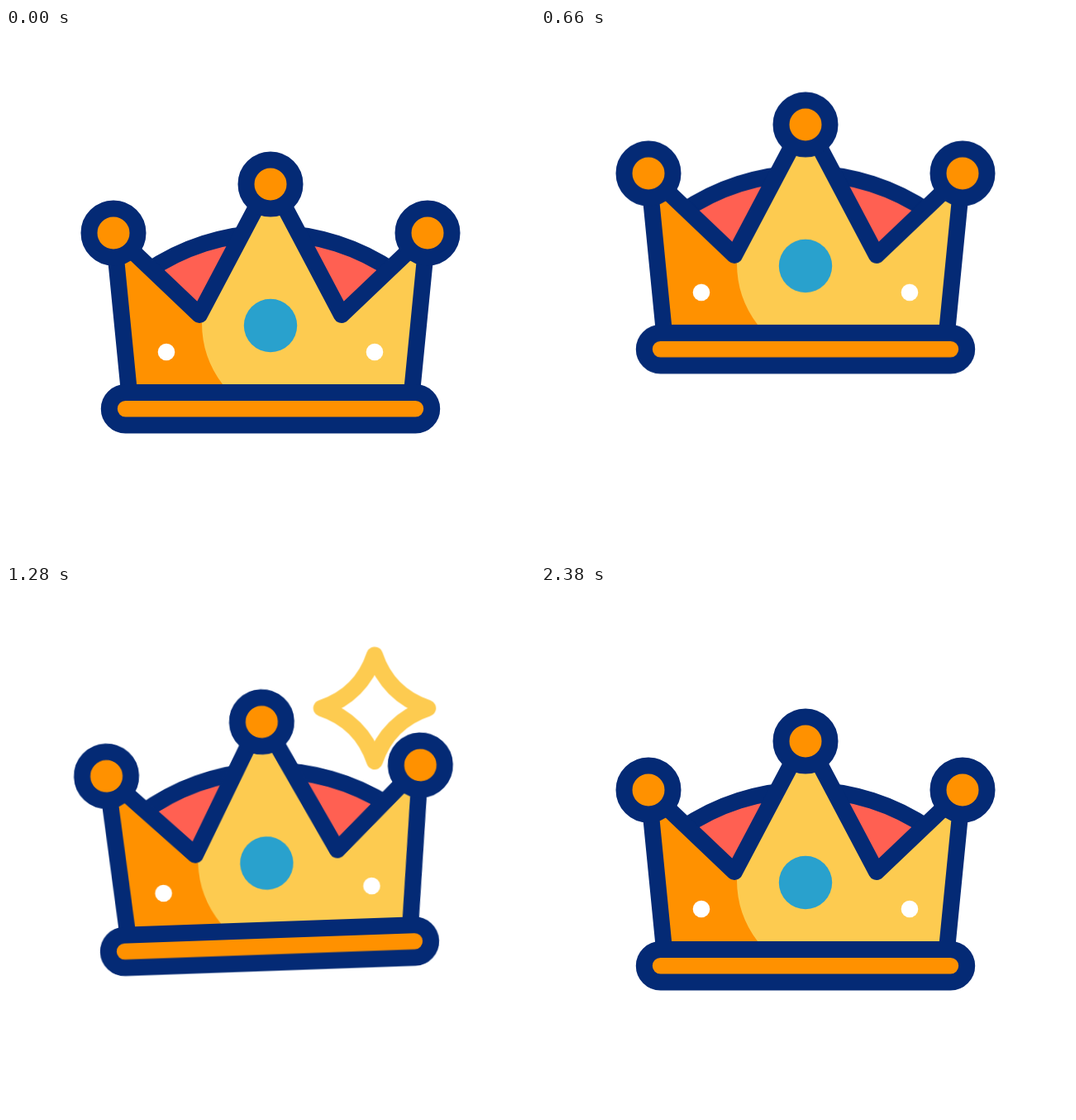
Recreate the animation shown at these times as an HTML page. Size 640 px wide and 640 px high, loop 2.4 s.

```html
<!DOCTYPE html>
<html lang="en">
<head>
<meta charset="utf-8">
<title>Crown</title>
<style>
  html, body { margin: 0; width: 100%; height: 100%; overflow: hidden; background: #fff; }
  svg { display: block; width: 100vw; height: 100vh; }

  .line { stroke: #042a75; stroke-width: 20; stroke-linejoin: round; stroke-linecap: round; }
  .gold { fill: #ff9100; }
  .face { fill: #fdcb50; }

  .hop, .tilt, .shine, .star { animation: 2400ms infinite cubic-bezier(.4, 0, .6, 1); }
  .hop { animation-name: hop; }
  .tilt { animation-name: tilt; transform-origin: 320px 490px; }
  .shine { animation-name: shine; animation-timing-function: linear; fill: #fff; }
  .star {
    animation-name: star;
    fill: none; stroke: #fdcb50; stroke-linejoin: round;
    vector-effect: non-scaling-stroke;
  }

  /* slow lift, fall, then two shrinking bounces */
  @keyframes hop {
    0% { transform: translateY(0); animation-timing-function: cubic-bezier(1, 0, .34, 1); }
    35% { transform: translateY(-76.5px); animation-timing-function: cubic-bezier(.58, 0, .6, 1); }
    47.08% { transform: translateY(-2px); }
    58.33% { transform: translateY(-38px); }
    71.25% { transform: translateY(-1px); }
    76.88% { transform: translateY(-20px); }
    85.83% { transform: translateY(0); }
    90.83% { transform: translateY(-3px); }
    97%, 100% { transform: translateY(0); }
  }
  @keyframes tilt {
    0%, 47.08% { transform: rotate(0deg); }
    59.58% { transform: rotate(-4deg); }
    69.58%, 70.83% { transform: rotate(0deg); }
    76.25% { transform: rotate(-2deg); }
    83.33%, 100% { transform: rotate(0deg); }
  }
  @keyframes shine {
    0%, 26.67% { transform: translateX(250px); }
    42.71%, 100% { transform: translateX(930px); }
  }
  @keyframes star {
    0%, 46.2% { transform: scale(.01); stroke-width: 0; opacity: 0; }
    46.3% { transform: scale(.01); stroke-width: 0; opacity: 1; }
    50% { transform: scale(1); stroke-width: 20; }
    55.83%, 85.83% { transform: scale(.6875); stroke-width: 20; }
    91.67% { transform: scale(1); stroke-width: 20; }
    98.4% { transform: scale(.01); stroke-width: 0; opacity: 1; }
    98.5%, 100% { transform: scale(.01); stroke-width: 0; opacity: 0; }
  }
</style>
</head>
<body>
<svg viewBox="0 0 640 640">
  <defs>
    <path id="body" d="M130 248L234 347L318 188H322L406 347L510 248L491 441H149Z"/>
    <clipPath id="inside"><use href="#body"/></clipPath>
  </defs>

  <g transform="translate(446 149)">
    <path class="star" d="M0-80C13-41 41-13 80 0C41 13 13 41 0 80C-13 41-41 13-80 0C-41-13-13-41 0-80Z"/>
  </g>

  <g class="hop"><g class="tilt">
    <path class="line" fill="#ff6052" d="M170 295A263.7 263.7 0 0 1 470 295L406 347H234Z"/>
    <use href="#body" class="face"/>
    <path class="gold" d="M130 248L234 347L237 357A122 122 0 0 0 262 431V441H149Z"/>
    <circle cx="320" cy="360" r="32.2" fill="#29a1cd"/>
    <g fill="#fff">
      <circle cx="194" cy="392" r="10.3"/>
      <circle cx="446" cy="392" r="10.3"/>
    </g>
    <g clip-path="url(#inside)">
      <path class="shine" d="M-200 200h29L-411 440h-29ZM-97 200h29L-308 440h-29Z"/>
    </g>
    <use href="#body" class="line" fill="none"/>
    <g class="line gold">
      <rect x="124.8" y="441" width="390.4" height="39.5" rx="19.75"/>
      <circle cx="130" cy="248" r="29.5"/>
      <circle cx="320" cy="189" r="29.5"/>
      <circle cx="510" cy="248" r="29.5"/>
    </g>
  </g></g>
</svg>
</body>
</html>
```
